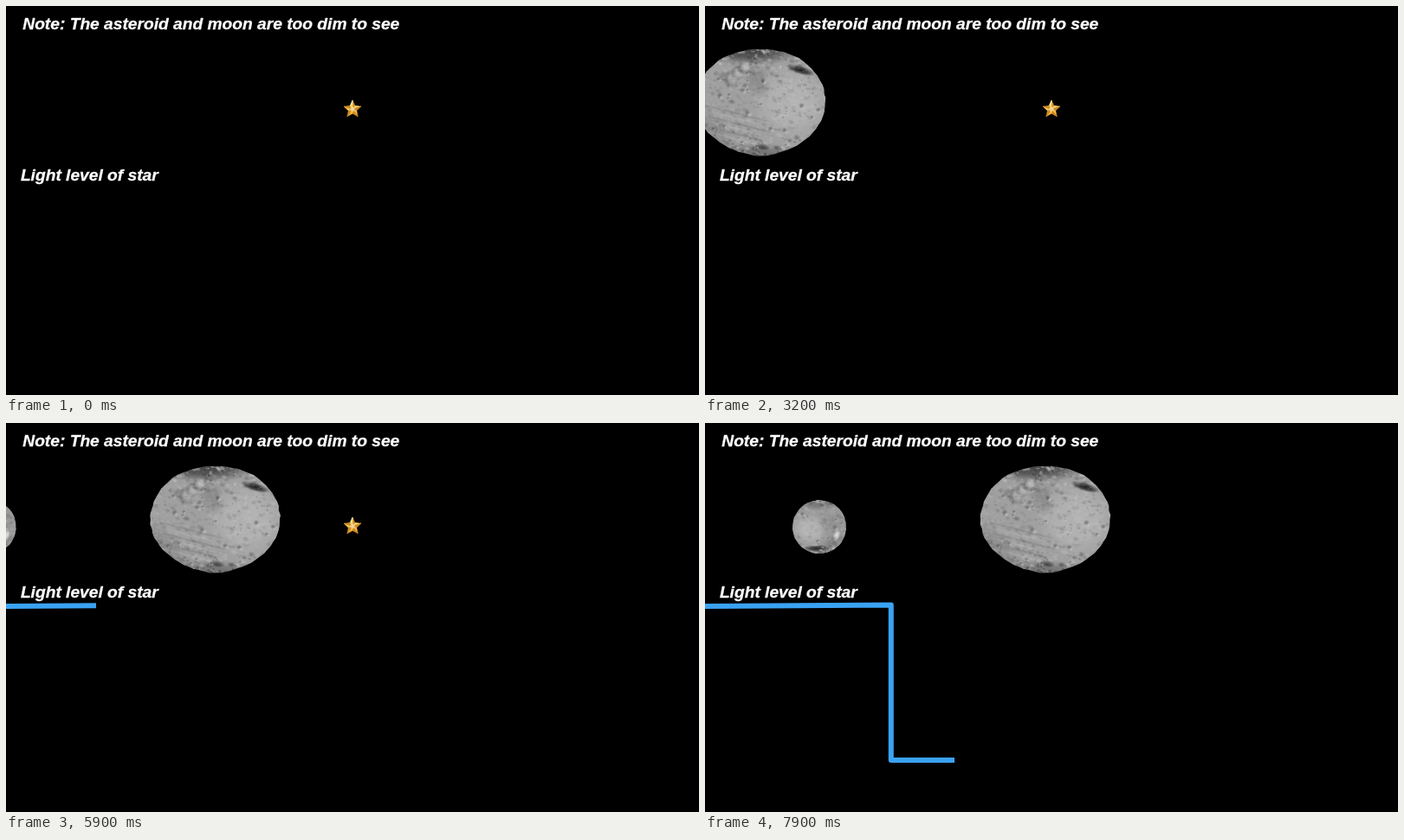
An HTML page with a canvas that plays this animation: 800 by 450 pixels, repeating every 8 s.

```html
<!DOCTYPE html>
<html lang="en">
<head>
<meta charset="utf-8">
<title>Asteroid and moon transit</title>
<style>
  html, body { margin: 0; width: 100%; height: 100%; overflow: hidden; background: #000; }
  canvas, svg { position: absolute; left: 0; top: 0; width: 800px; height: 450px; display: block; }
  text {
    font: italic bold 19.2px "Liberation Sans", Arial, sans-serif;
    fill: #fff; stroke: #fff; stroke-width: .3px;
  }
</style>
</head>
<body>
<canvas id="stage" width="800" height="450"></canvas>
<svg viewBox="0 0 800 450">
  <text x="19.3" y="26.6">Note: The asteroid and moon are too dim to see</text>
  <text x="16.9" y="201.6">Light level of star</text>
</svg>
<script>
const LOOP = 8000, STEP = 100, SCALE = 2, TAU = Math.PI * 2;
const ctx = document.getElementById('stage').getContext('2d');

function makeRandom(seed) {
  return () => (seed = seed * 16807 % 2147483647) / 2147483647;
}

const grey = (v, a) => `rgba(${v},${v},${v},${a})`;

// Soft spot; positions are relative to the centre of the rock
function glow(g, x, y, rx, ry, turn, v, alpha) {
  g.save();
  g.translate(x, y);
  g.rotate(turn);
  g.scale(rx, ry);
  const fade = g.createRadialGradient(0, 0, 0, 0, 0, 1);
  fade.addColorStop(0, grey(v, alpha));
  fade.addColorStop(0.5, grey(v, alpha * 0.75));
  fade.addColorStop(1, grey(v, 0));
  g.fillStyle = fade;
  g.fillRect(-1, -1, 2, 2);
  g.restore();
}

// Shaded hollow with a lit rim at the lower right
function crater(g, x, y, r, alpha) {
  glow(g, x - r * 0.4, y - r * 0.4, r * 1.3, r * 1.2, 0, 70, alpha);
  glow(g, x + r * 0.5, y + r * 0.5, r, r, 0, 205, alpha);
}

// Ellipse with fuller upper shoulders, a tapered base and a chipped edge
function outline(g, rx, ry, taper, rnd) {
  g.beginPath();
  for (let i = 0; i < 72; i++) {
    const a = i / 72 * TAU;
    const r = 1 - taper * Math.sin(a) * Math.abs(Math.sin(2 * a)) + (rnd() - 0.5) * 0.018;
    g.lineTo(rx * r * Math.cos(a), ry * r * Math.sin(a));
  }
  g.closePath();
}

function makeRock({ seed, rx, ry, taper, base, details }) {
  const c = document.createElement('canvas'), g = c.getContext('2d'), rnd = makeRandom(seed);
  const w = 2 * rx + 4, h = 2 * ry + 4, area = rx * ry;
  const spread = r => (rnd() * 2 - 1) * r;
  c.width = w * SCALE;
  c.height = h * SCALE;
  g.scale(SCALE, SCALE);
  g.translate(w / 2, h / 2);
  outline(g, rx, ry, taper, rnd);
  g.clip();
  g.fillStyle = grey(base, 1);
  g.fillRect(-w / 2, -h / 2, w, h);
  details(g);

  // mottled ground, rougher towards the top and bottom
  for (let i = 0; i < area * 0.35; i++) {
    const x = spread(rx), y = spread(ry), r = 0.8 + 2.4 * rnd() ** 2;
    const rough = 0.12 + 0.4 * (y / ry) ** 4;
    glow(g, x, y, r * 1.4, r, 0.3, rnd() < 0.5 ? 50 : 215, rough * rnd() * 1.5);
  }
  for (let i = 0; i < area * 0.014; i++)
    crater(g, spread(rx), spread(ry), 0.8 + 2 * rnd() ** 3, 0.45);
  return { c, w, h };
}

const asteroid = makeRock({
  seed: 731, rx: 75, ry: 61.5, taper: 0.03, base: 160,
  details(g) {
    glow(g, 36, 0, 48, 46, 0.3, 188, 0.75);
    glow(g, -60, 36, 42, 24, 0.8, 115, 0.5);
    glow(g, -4, -28, 14, 24, -0.3, 115, 0.5);
    glow(g, -12, -62, 62, 19, 0, 50, 0.85);
    glow(g, 0, 60, 62, 13, 0, 85, 0.6);
    glow(g, 46, -38, 18, 5, 0.3, 25, 0.95);
    glow(g, 2, 51, 9, 4, 0.2, 40, 0.7);
    // three joined craters, shrinking up the slope
    for (let i = 0; i < 3; i++) {
      const x = -32 + 7 * i, y = -29 - 6 * i, r = 8 - i;
      glow(g, x - 2, y + 1, r * 1.2, r * 1.35, 0.5, 60, 0.6);
      glow(g, x, y, r, r * 1.15, 0.5, 205, 0.85);
    }
    // grooves along the equator
    for (let i = 0; i < 7; i++)
      glow(g, -28, 12 + 6 * i, 48, 2, 0.25, i % 2 ? 190 : 95, 0.3);
  }
});

const moon = makeRock({
  seed: 97, rx: 31, ry: 31, taper: 0, base: 155,
  details(g) {
    glow(g, -11, 3, 21, 19, 0, 195, 0.75);
    glow(g, 14, -4, 17, 18, 0.3, 135, 0.4);
    glow(g, 0, -28, 28, 9, 0, 90, 0.6);
    glow(g, 16, 20, 17, 11, -0.6, 110, 0.5);
    glow(g, -3, 25, 15, 4, 0, 30, 0.9);
    glow(g, 20, 10, 4, 7, 0.35, 230, 0.9);
  }
});

function drawStar(x, y) {
  const tip = i => {
    const a = TAU * (i / 10 - 0.25), r = i % 2 ? 5 : 10.4;
    return [x + r * Math.cos(a), y + r * Math.sin(a)];
  };
  const shine = ctx.createLinearGradient(x, y - 10, x, y + 10);
  shine.addColorStop(0, '#fffbe8');
  shine.addColorStop(0.35, '#ffd35c');
  shine.addColorStop(1, '#f3a024');
  ctx.lineWidth = 0.5;
  for (let i = 0; i < 10; i++) {
    ctx.beginPath();
    ctx.moveTo(x, y);
    ctx.lineTo(...tip(i));
    ctx.lineTo(...tip(i + 1));
    ctx.closePath();
    ctx.fillStyle = ctx.strokeStyle = i % 2 ? shine : '#d08a22';
    ctx.fill();
    ctx.stroke();
  }
  glow(ctx, x, y, 3.5, 3.5, 0, 255, 0.6);
}

// The light curve is revealed by a slowing wipe from the left
function drawCurve(t) {
  const u = t - 5.9;
  const edge = t < 5 ? 0 : 104 + 107.5 * u - 7.75 * u * u;
  ctx.save();
  ctx.beginPath();
  ctx.rect(0, 0, edge, 450);
  ctx.clip();
  ctx.beginPath();
  ctx.moveTo(-10, 212.1);
  ctx.lineTo(214.8, 210.4);
  ctx.lineTo(214.8, 390);
  ctx.lineTo(320, 390);
  ctx.lineWidth = 6;
  ctx.lineJoin = 'round';
  ctx.strokeStyle = '#3aa2f3';
  ctx.stroke();
  ctx.restore();
}

function place({ c, w, h }, x, y) {
  ctx.drawImage(c, x - w / 2, y - h / 2, w, h);
}

function draw(ms) {
  const t = ms / 1000;
  const x = -83 + 32.36 * t + 4.755 * t ** 2 - 0.155 * t ** 3;
  ctx.fillStyle = '#000';
  ctx.fillRect(0, 0, 800, 450);
  drawStar(400, 119.4);
  drawCurve(t);
  place(asteroid, x, 112);
  place(moon, x - 261, 120.2);
}

const start = performance.now();
function frame() {
  const ms = (performance.now() - start) % LOOP;
  draw(Math.floor(ms / STEP) * STEP);
  requestAnimationFrame(frame);
}
frame();
</script>
</body>
</html>
```
